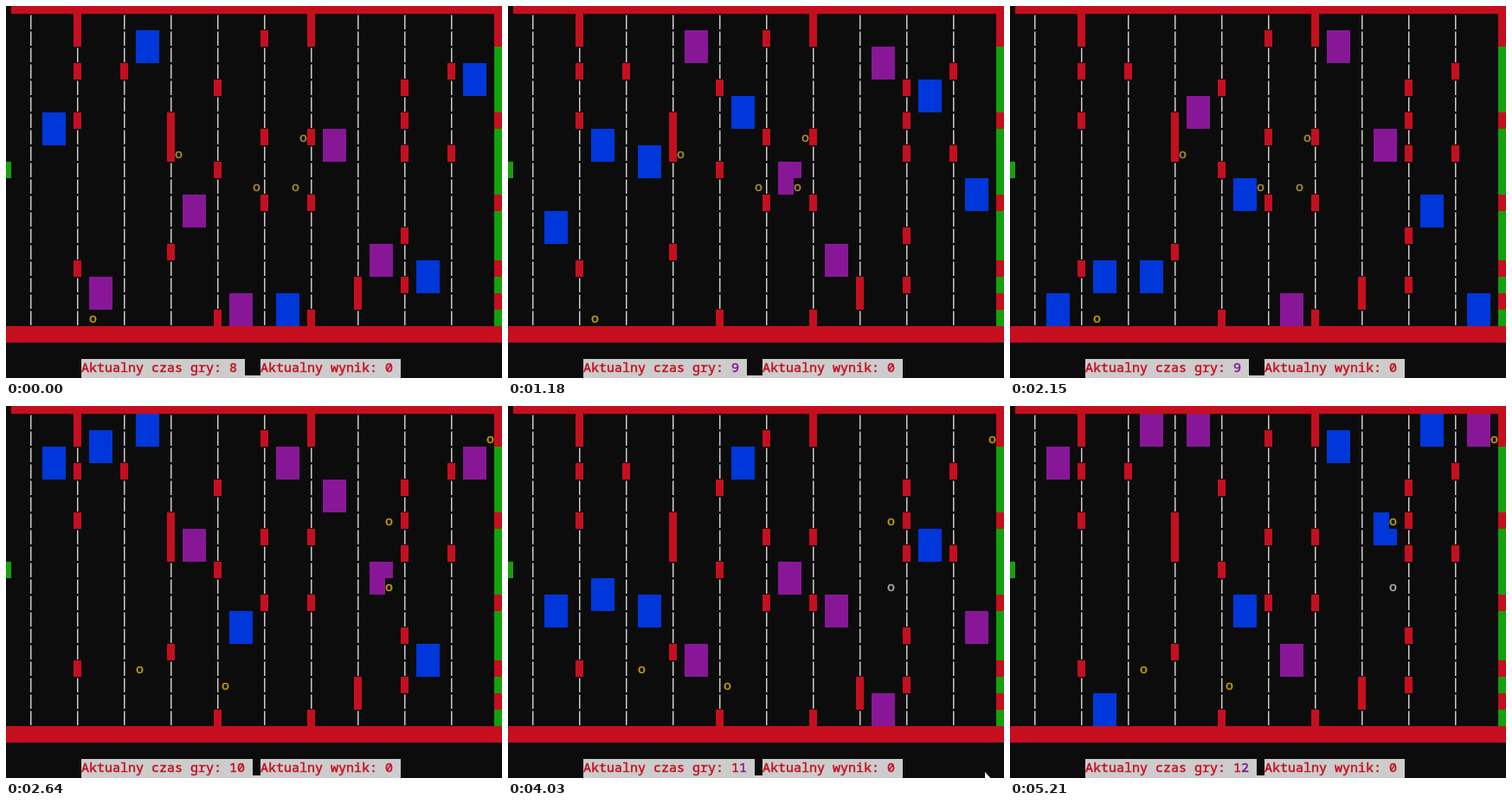
These frames come from a looping animation (573 by 430 pixels, 5.29 s). An HTML page with a canvas:

```html
<!DOCTYPE html>
<html lang="pl">
<head>
<meta charset="utf-8">
<title>Console road game</title>
<style>
  html, body { margin: 0; width: 100%; height: 100%; overflow: hidden; background: #0c0c0c; }
  canvas { display: block; }
</style>
</head>
<body>
<canvas id="stage" width="573" height="430"></canvas>
<script>
const ctx = document.getElementById('stage').getContext('2d');
const BLACK = '#0c0c0c', RED = '#c50f1f', GREEN = '#13a10e', GREY = '#cccccc';
const BLUE = '#0037da', PURPLE = '#881798', YELLOW = '#c19c00', DIM = '#a58b30';

const LOOP = 5290, TICK = 69.5, LEAD = 8, LAST_TICK = 75;
const ROWS = 19, LAP = 18;
const colX = c => 6 + c * 9;
const rowY = r => 9 + r * 19;

// Every car drives one lap at its own pace, in rows per tick
const blue = pace => ({ color: BLUE, pace });
const purple = pace => ({ color: PURPLE, pace });

// walls: barrier rows on the line left of the lane; start: row of the first car
const LANES = [
  { walls: [], start: 6, cars: [blue(0.36), blue(0.475), purple(0.55)] },
  { walls: [0, 1, 3, 6, 15], start: 16, cars: [purple(0.5), blue(0.57), blue(0.45)] },
  { walls: [3], start: 1, cars: [blue(0.455), blue(0.58), purple(0.1)] },
  { walls: [6, 7, 8, 14], start: 11, cars: [purple(0.55), purple(0.315), purple(0.15)] },
  { walls: [4, 9, 18], start: 17, cars: [purple(1), blue(0.35), blue(0.5)] },
  { walls: [1, 7, 11], start: 17, cars: [blue(1), purple(0.599), purple(0.338)] },
  { walls: [0, 1, 7, 11, 18], start: 7, cars: [purple(0.418), purple(0.378), blue(0.95)] },
  { walls: [16, 17], start: 14, cars: [purple(0.36), purple(0.37), blue(0.42)] },
  { walls: [4, 6, 8, 13, 16], start: 15, cars: [blue(0.5), blue(0.452), blue(0.63), blue(0.5)] },
  { walls: [3, 8], start: 3, cars: [blue(0.46), purple(0.48), purple(0.2)] }
];
const GATE_REDS = [0, 1, 6, 11, 15, 17];

function box(x, y, w, h, color) {
  ctx.fillStyle = color;
  ctx.fillRect(x, y, w, h);
}

function cell(c, r, color) {
  box(colX(c), rowY(r), 9, 19, color);
}

// A thin outline gives the console font its heavier stems
function print(text, c, r, color) {
  ctx.fillStyle = ctx.strokeStyle = color;
  [...text].forEach((ch, i) => {
    ctx.fillText(ch, colX(c + i), rowY(r) + 15);
    ctx.strokeText(ch, colX(c + i), rowY(r) + 15);
  });
}

function drawRoad() {
  box(0, 0, 573, 430, BLACK);
  LANES.forEach(({ walls }, i) => {
    for (let r = 0; r < ROWS; r++) {
      if (walls.includes(r)) cell(2 + i * 6, r, RED);
      else box(28 + i * 54, rowY(r) + 1.5, 1.5, 16.5, GREY);
    }
  });
  for (let r = 0; r < ROWS; r++) cell(62, r, GATE_REDS.includes(r) ? RED : GREEN);
  box(6, 0, 567, 9, RED);
  box(0, 370, 573, 19, RED);
  box(0, rowY(9), 6, 19, GREEN);
}

function carAt({ start, cars }, n) {
  let row = start, left = n, k = 0;
  while (k < cars.length - 1 && row + left * cars[k].pace >= LAP) {
    left -= (LAP - row) / cars[k].pace;
    row = 0;
    k++;
  }
  return { row: Math.floor(row + left * cars[k].pace), color: cars[k].color };
}

function drawCars(n) {
  LANES.forEach((lane, i) => {
    const { row, color } = carAt(lane, n);
    box(42 + i * 54, rowY(row), 27, 38, color);
  });
}

function drawCoin(c, r, color) {
  cell(c, r, BLACK);
  print('o', c, r, color);
}

function drawCoins(n, time) {
  if (time < 10) {
    drawCoin(21, 8, DIM);
    drawCoin(37, 7, DIM);
    drawCoin(31, 10, DIM);
    drawCoin(36, 10, DIM);
    drawCoin(10, 18, YELLOW);
  } else {
    drawCoin(61, 1, YELLOW);
    drawCoin(48, 6, YELLOW);
    drawCoin(48, 10, n < 43 ? YELLOW : '#aaaaaa');
    drawCoin(16, 15, YELLOW);
    drawCoin(27, 16, YELLOW);
  }
}

function drawStatus(time) {
  const digits = String(time);
  const label = 'Aktualny czas gry: ' + digits.slice(0, -1);
  const score = 'Aktualny wynik: 0';
  const lastColor = time === 8 || time === 10 ? RED : PURPLE;
  box(87, 408, (label.length + 2) * 9, 19, GREY);
  box(294, 408, (score.length + 1) * 9, 19, GREY);
  box(87, 427, 369, 3, GREY);
  print(label, 9, 21, RED);
  print(digits.slice(-1), 9 + label.length, 21, lastColor);
  print(score, 32, 21, RED);
}

// The pointer peeks in from the bottom edge around the given tick
function drawPointer(n, peak, top) {
  const away = Math.abs(n - peak);
  if (away > 1) return;
  const x = 551, y = top + away * 4;
  ctx.fillStyle = '#ffffff';
  ctx.beginPath();
  ctx.moveTo(x, y);
  ctx.lineTo(x, y + 17);
  ctx.lineTo(x + 4, y + 13);
  ctx.lineTo(x + 11, y + 12);
  ctx.fill();
}

function frame(now) {
  const n = Math.min(LAST_TICK, Math.floor((now % LOOP + LEAD) / TICK));
  const time = 8 + Math.floor((n + 0.5) / 16.3);
  ctx.font = '15px "Noto Sans Mono", "DejaVu Sans Mono", monospace';
  ctx.lineWidth = 0.5;
  drawRoad();
  drawCars(n);
  drawCoins(n, time);
  drawStatus(time);
  drawPointer(n, 11, 419);
  drawPointer(n, 58, 423);
  requestAnimationFrame(frame);
}

frame(0);
</script>
</body>
</html>
```
